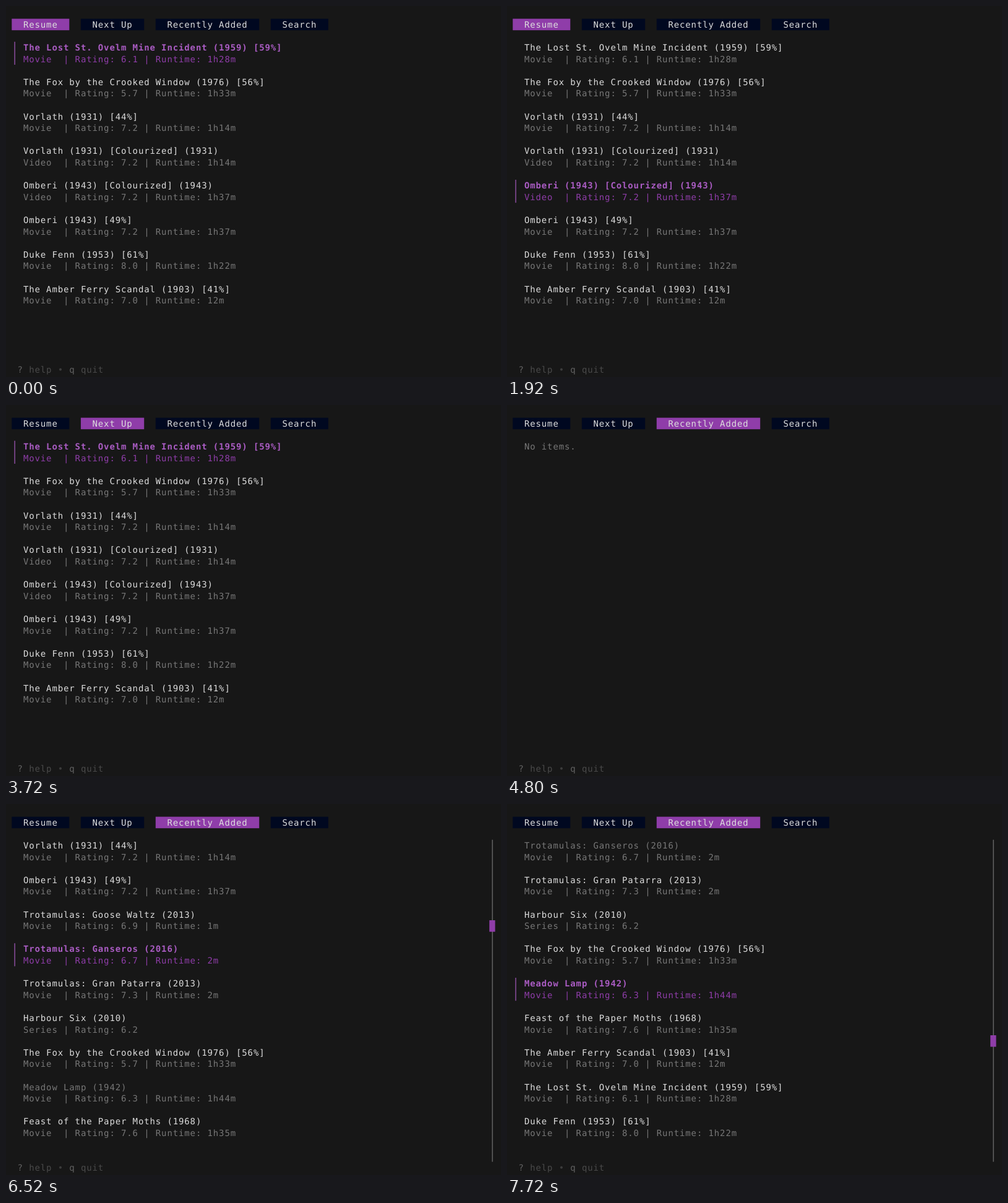
Recreate the animation shown at these times as an HTML page with a canvas. Size 800 px wide and 600 px high, loop 8000 ms.

```html
<!DOCTYPE html>
<html lang="en">
<head>
<meta charset="utf-8">
<title>Media list</title>
<style>
  html, body { margin: 0; height: 100%; overflow: hidden; background: #171717; }
  canvas { display: block; }
</style>
</head>
<body>
<canvas id="screen" width="800" height="600"></canvas>
<script>
const ctx = document.getElementById('screen').getContext('2d');

const LOOP = 8000;
const CELL = 9.3, ROW = 18.6, TOP = 2;
const LIST_ROW = 3, TRACK_ROWS = 28, PER_PAGE = 9;
const COLOR = {
  back: '#171717', navy: '#000820', purple: '#8f3da9', accent: '#aa5cc3',
  title: '#dddddd', detail: '#777777', key: '#626262', hint: '#4a4a4a', dot: '#3c3c3c'
};

const item = (title, rating, runtime, { kind = 'Movie', seen = false } = {}) => ({
  title, seen,
  detail: `${kind.padEnd(6)} | Rating: ${rating}` + (runtime ? ` | Runtime: ${runtime}` : '')
});

const mine = item('The Lost St. Ovelm Mine Incident (1959) [59%]', '6.1', '1h28m');
const fox = item('The Fox by the Crooked Window (1976) [56%]', '5.7', '1h33m');
const vorlath = item('Vorlath (1931) [44%]', '7.2', '1h14m');
const omberi = item('Omberi (1943) [49%]', '7.2', '1h37m');
const duke = item('Duke Fenn (1953) [61%]', '8.0', '1h22m');
const ferry = item('The Amber Ferry Scandal (1903) [41%]', '7.0', '12m');

const resumeList = [
  mine, fox, vorlath,
  item('Vorlath (1931) [Colourized] (1931)', '7.2', '1h14m', { kind: 'Video' }),
  item('Omberi (1943) [Colourized] (1943)', '7.2', '1h37m', { kind: 'Video' }),
  omberi, duke, ferry
];
const recentList = [
  vorlath, omberi,
  item('Trotamulas: Goose Waltz (2013)', '6.9', '1m'),
  item('Trotamulas: Ganseros (2016)', '6.7', '2m', { seen: true }),
  item('Trotamulas: Gran Patarra (2013)', '7.3', '2m'),
  item('Harbour Six (2010)', '6.2', '', { kind: 'Series' }),
  fox,
  item('Meadow Lamp (1942)', '6.3', '1h44m', { seen: true }),
  item('Feast of the Paper Moths (1968)', '7.6', '1h35m'),
  ferry, mine, duke
];

const tabs = ['Resume', 'Next Up', 'Recently Added', 'Search'];
const resumeMoves = [920, 1200, 1600, 1920, 2200, 2520, 2800];
const recentMoves = [5920, 6200, 6520, 6800, 7120, 7400, 7720];

const countPassed = (times, t) => times.filter(time => time <= t).length;
const rowY = row => TOP + row * ROW;

// A newly opened tab keeps showing the previous list until its own has loaded.
function stateAt(t) {
  if (t < 3720) return { tab: 0, list: resumeList, selected: countPassed(resumeMoves, t) };
  if (t < 3800) return { tab: 1, list: resumeList, selected: 0 };
  if (t < 4800) return { tab: 1, list: [], selected: 0 };
  if (t < 4920) return { tab: 2, list: [], selected: 0 };
  return { tab: 2, list: recentList, selected: countPassed(recentMoves, t) };
}

function rect(col, row, cols, rows, color) {
  ctx.fillStyle = color;
  ctx.fillRect(col * CELL, rowY(row), cols * CELL, rows * ROW);
}

function text(string, col, row, color, weight = 'normal') {
  ctx.font = `${weight} 14px "DejaVu Sans Mono", monospace`;
  ctx.letterSpacing = '0px';
  ctx.letterSpacing = `${CELL - ctx.measureText('M').width}px`;
  ctx.fillStyle = color;
  ctx.fillText(string, col * CELL, Math.round(rowY(row) + 14.2));
}

function verticalLine(col, row, rows, color) {
  ctx.fillStyle = color;
  ctx.fillRect(Math.round((col + 0.5) * CELL) - 0.5, rowY(row), 1.2, rows * ROW);
}

function drawTabs(active) {
  let col = 1;
  tabs.forEach((label, i) => {
    const cols = label.length + 4;
    rect(col, 1, cols, 1, i === active ? COLOR.purple : COLOR.navy);
    text(label, col + 2, 1, COLOR.title);
    col += cols + 2;
  });
}

function drawList(list, selected) {
  if (!list.length) {
    text('No items.', 3, LIST_ROW, COLOR.detail);
    return;
  }
  const maxScroll = Math.max(0, list.length - PER_PAGE);
  const scroll = Math.min(Math.max(selected - 4, 0), maxScroll);
  list.slice(scroll, scroll + PER_PAGE).forEach(({ title, detail, seen }, i) => {
    const row = LIST_ROW + i * 3;
    if (scroll + i === selected) {
      verticalLine(1, row, 2, COLOR.accent);
      text(title, 3, row, COLOR.accent, 'bold');
      text(detail, 3, row + 1, COLOR.purple);
    } else {
      text(title, 3, row, seen ? COLOR.detail : COLOR.title);
      text(detail, 3, row + 1, COLOR.detail);
    }
  });
  if (maxScroll) {
    const offset = Math.floor(selected * TRACK_ROWS / (list.length - 1));
    verticalLine(84, LIST_ROW, TRACK_ROWS, COLOR.detail);
    rect(84, LIST_ROW + Math.min(offset, TRACK_ROWS - 1), 1, 1, COLOR.purple);
  }
}

function drawHelp() {
  text('?', 2, 31, COLOR.key);
  text('help', 4, 31, COLOR.hint);
  text('•', 9, 31, COLOR.dot);
  text('q', 11, 31, COLOR.key);
  text('quit', 13, 31, COLOR.hint);
}

function draw(now) {
  const { tab, list, selected } = stateAt(now % LOOP);
  ctx.fillStyle = COLOR.back;
  ctx.fillRect(0, 0, 800, 600);
  drawTabs(tab);
  drawList(list, selected);
  drawHelp();
}

ctx.textRendering = 'geometricPrecision';
const start = performance.now();
function tick() {
  draw(performance.now() - start);
  requestAnimationFrame(tick);
}
tick();
</script>
</body>
</html>
```
